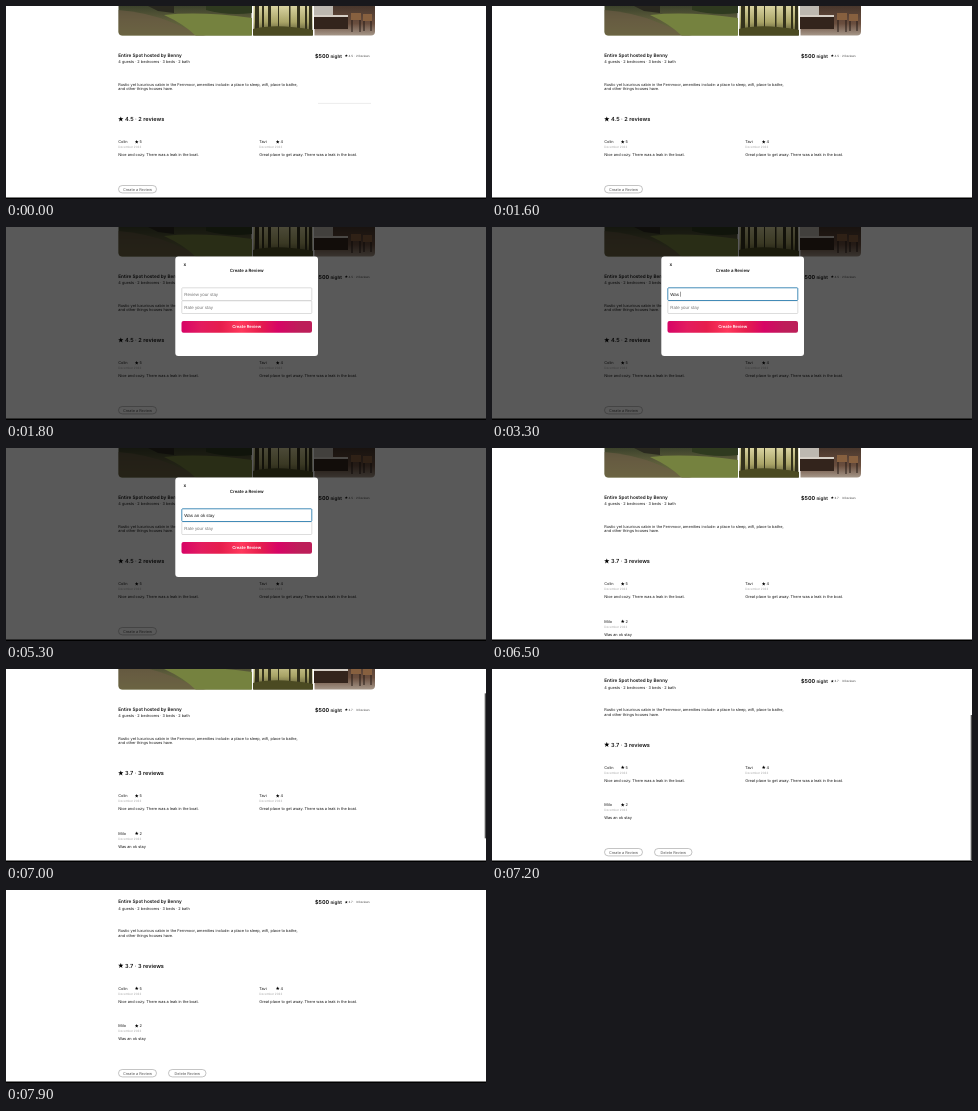
An HTML page that plays this animation: 480 px wide and 193 px high, repeating every 8000 ms.

```html
<!DOCTYPE html>
<html lang="en">
<head>
<meta charset="utf-8">
<title>Create a review</title>
<style>
html, body { margin: 0; width: 100%; height: 100%; overflow: hidden; background: #fff; }
svg { display: block; width: 480px; height: 193px; }
text { font-family: Inter, "Liberation Sans", sans-serif; font-size: 3.86px; fill: #161616; text-rendering: geometricPrecision; white-space: pre; }
.bold { font-weight: 600; font-size: 4.67px; fill: #111; }
.price { font-weight: 700; font-size: 5.4px; }
.rating { font-weight: 600; font-size: 5.6px; fill: #111; }
.tiny { font-size: 2.9px; fill: #444; }
.date { font-size: 3px; fill: #aaa; }
.pill { fill: #fff; stroke: #888; stroke-width: .5; }
.mid { text-anchor: middle; }
.label { fill: #555; font-size: 3.8px; }
.input { font-family: "Liberation Sans", Arial, sans-serif; font-size: 4.44px; }
.hint { fill: #757575; }
.field { fill: #fff; stroke: #bbb; stroke-width: .5; }
.focus { stroke: #2f7fb0; stroke-width: .9; }
</style>
</head>
<body>
<svg viewBox="0 0 480 193">
  <defs>
    <linearGradient id="hill" x2="0" y2="1">
      <stop offset="0" stop-color="#39402a"/><stop offset=".45" stop-color="#5b5a3a"/><stop offset="1" stop-color="#68733c"/>
    </linearGradient>
    <linearGradient id="glow" x2="0" y2="1">
      <stop offset="0" stop-color="#dcd6a4"/><stop offset=".55" stop-color="#a9a467"/><stop offset="1" stop-color="#3d3b20"/>
    </linearGradient>
    <linearGradient id="room" x2="0" y2="1">
      <stop offset="0" stop-color="#46352b"/><stop offset=".6" stop-color="#6a4e3e"/><stop offset="1" stop-color="#a89a8c"/>
    </linearGradient>
    <linearGradient id="pink">
      <stop offset="0" stop-color="#d70466"/><stop offset=".15" stop-color="#e31c5f"/><stop offset=".3" stop-color="#e61e4d"/>
      <stop offset=".46" stop-color="#ff385c"/><stop offset=".6" stop-color="#e61e4d"/><stop offset=".74" stop-color="#d70466"/>
      <stop offset=".9" stop-color="#bd1e59"/>
    </linearGradient>
    <clipPath id="frame"><rect x="112.5" y="-40" width="256.5" height="69.5" rx="4"/></clipPath>
    <path id="star" d="M0-1 .26-.33 .97-.31 .41 .13 .6 .82 0 .42-.6 .82-.41 .13-.97-.31-.26-.33Z"/>
  </defs>

  <g id="page">
    <g clip-path="url(#frame)">
      <rect x="112" y="-1" width="133.5" height="31" fill="url(#hill)"/>
      <path d="M112 4Q140 6 165 16T200 30H112Z" fill="#6e5c45" opacity=".65"/>
      <path d="M158 9Q195 5 246 12V30H190Q178 18 158 9Z" fill="#75823f"/>
      <path d="M200-1H246V7Q222 10 200 4Z" fill="#2f3a1f"/>
      <path d="M140-1H168V7L152 5Z" fill="#2a291f"/>
      <rect x="247.5" y="-1" width="59" height="31" fill="url(#glow)"/>
      <g id="trunks" fill="#34321c"/>
      <path d="M247 23Q270 17 307 24V30H247Z" fill="#4b4a22"/>
      <rect x="308.5" y="-1" width="61" height="31" fill="url(#room)"/>
      <path d="M308-1H327V9H308Z" fill="#bdb8b0"/>
      <path d="M308 11H342V23H308Z" fill="#33241c"/>
      <path d="M308 9H342V11H308Z" fill="#d6cfc6"/>
      <path d="M345 7H355V14H345ZM357 8H366V15H357Z" fill="#87603f"/>
      <path d="M346 14V26M354 14V26M358 15V25M365 15V25" stroke="#251b16"/>
    </g>
    <text class="bold" x="112.3" y="50.5">Entire Spot hosted by Benny</text>
    <text x="112.3" y="57.3">4 guests · 2 bedrooms · 3 beds · 2 bath</text>
    <text class="bold price" x="309" y="51.8">$500</text>
    <text class="bold" x="324.5" y="51.8">night</text>
    <use href="#star" transform="translate(340.3 49.7) scale(1.5)"/>
    <text class="tiny" x="342.6" y="50.7" id="score"></text>
    <text class="tiny" x="350" y="50.7" id="count"></text>
    <path id="rule" d="M312 97.4H365" stroke="#ddd" stroke-width=".6"/>
    <text x="112.3" y="79.8">Rustic yet luxurious cabin in the Fernmoor, amenities include: a place to sleep, wifi, place to bathe,</text>
    <text x="112.3" y="84.4">and other things houses have.</text>
    <use href="#star" transform="translate(114.8 113.2) scale(2.7)"/>
    <text class="rating" x="119" y="115.1" id="rating"></text>
    <g id="reviews"></g>
    <g id="actions">
      <rect class="pill" x="112.5" y="179.5" width="38" height="7.4" rx="3.7"/>
      <text class="label mid" x="131.5" y="184.6">Create a Review</text>
      <g id="remove">
        <rect class="pill" x="162.5" y="179.5" width="37.5" height="7.4" rx="3.7"/>
        <text class="label mid" x="181.3" y="184.6">Delete Review</text>
      </g>
    </g>
  </g>
  <rect id="thumb" x="478.7" width="1.3" height="145" fill="#555"/>

  <g id="modal">
    <rect width="480" height="193" opacity=".65"/>
    <rect x="169.3" y="29.5" width="142.7" height="99.5" rx="3" fill="#fff"/>
    <text class="bold mid" x="178.8" y="39.2">x</text>
    <text class="bold mid" x="240.7" y="44.6" style="font-size:4.35px">Create a Review</text>
    <rect class="field" id="rateBox" x="175.8" y="73.8" width="130" height="12.7" rx=".8"/>
    <rect class="field" id="textBox" x="175.8" y="60.8" width="130" height="12.7" rx=".8"/>
    <text class="input" id="textValue" x="178.3" y="68.8"></text>
    <text class="input" id="rateValue" x="178.3" y="81.8"></text>
    <rect id="caret" width=".4" height="5" fill="#111"/>
    <rect x="175.5" y="94" width="130.5" height="11.7" rx="2" fill="url(#pink)"/>
    <text class="bold mid" x="240.7" y="101.4" style="font-size:4.2px;fill:#fff">Create Review</text>
  </g>
  <rect y="191.5" width="480" height="1.5"/>
</svg>
<script>
const LOOP = 8000, ROW = 37.5;
const OPEN = 1800, CLOSE = 6500;
const FOCUS_TEXT = 2500, FOCUS_RATE = 5400, RATED = 5700;
const MESSAGE = "Was an ok stay";
const KEYS = [2800, 3100, 3200, 3300, 3800, 3900, 4000, 4100, 4200, 4300, 4400, 4600, 4700, 4800];
const SCROLL = [[0, 0], [7000, 9], [7100, 26], [7200, ROW]];
const BAR = [[0, 0], [7000, 1], [7700, .6], [7800, .3], [7900, 0]];

const $ = id => document.getElementById(id);
const show = (id, on) => { $(id).style.display = on ? "" : "none"; };
const write = (id, s) => { if ($(id).textContent !== s) $(id).textContent = s; };
const step = (table, t) => table.filter(([at]) => at <= t).pop()[1];

const review = (id, x, y, name, stars, body) => `<g id="${id}" transform="translate(${x} ${y})">
  <text y="1.4">${name}</text>
  <use href="#star" transform="translate(18.4 0) scale(1.9)"/>
  <text x="21.2" y="1.4">${stars}</text>
  <text class="date" y="6.2">December 2022</text>
  <text y="14.4">${body}</text></g>`;

$("reviews").innerHTML =
  review("first", 112.3, 136, "Colin", 5, "Nice and cozy. There was a leak in the boat.") +
  review("second", 253.3, 136, "Tavi", 4, "Great place to get away. There was a leak in the boat.") +
  review("added", 112.3, 136 + ROW, "Milo", 2, MESSAGE);

$("trunks").innerHTML = [[249, 4], [256, 2], [262, 3], [272, 1], [283, 1.5], [291, 3], [299, 2], [303, 3]]
  .map(([x, w]) => `<rect x="${x}" y="-1" width="${w}" height="27"/>`).join("");

function drawForm(t) {
  const typed = KEYS.filter(k => k <= t).length;
  const onText = t >= FOCUS_TEXT && t < FOCUS_RATE;
  const rated = t >= RATED;
  write("textValue", typed ? MESSAGE.slice(0, typed) : "Review your stay");
  write("rateValue", rated ? "2" : "Rate your stay");
  $("textValue").classList.toggle("hint", !typed);
  $("rateValue").classList.toggle("hint", !rated);
  $("textBox").classList.toggle("focus", onText);
  $("rateBox").classList.toggle("focus", t >= FOCUS_RATE);

  // The caret restarts its blink at each key or focus.
  const last = Math.max(...[FOCUS_TEXT, ...KEYS, FOCUS_RATE, RATED].filter(k => k <= t));
  show("caret", t >= FOCUS_TEXT && (t - last) % 1000 < 500);
  const field = $(onText ? "textValue" : "rateValue");
  const length = onText ? typed : +rated;
  $("caret").setAttribute("x", 178.3 + (length ? field.getSubStringLength(0, length) : 0) + .2);
  $("caret").setAttribute("y", onText ? 64.7 : 77.7);
}

function draw(t) {
  const open = t >= OPEN && t < CLOSE, done = t >= CLOSE;
  const scroll = step(SCROLL, t);
  $("page").setAttribute("transform", `translate(0 ${-scroll})`);
  $("actions").setAttribute("transform", `translate(0 ${done ? ROW : 0})`);
  $("thumb").setAttribute("y", 46 - (ROW - scroll) * .76);
  $("thumb").setAttribute("opacity", step(BAR, t));
  write("score", done ? "3.7 ·" : "4.5 ·");
  write("count", done ? "3 Reviews" : "2 Reviews");
  write("rating", done ? "3.7 · 3 reviews" : "4.5 · 2 reviews");
  show("rule", t < 300);
  show("added", done);
  show("remove", done);
  show("modal", open);
  if (open) drawForm(t);
}

function tick() {
  draw(performance.now() % LOOP);
  requestAnimationFrame(tick);
}
tick();
</script>
</body>
</html>
```
